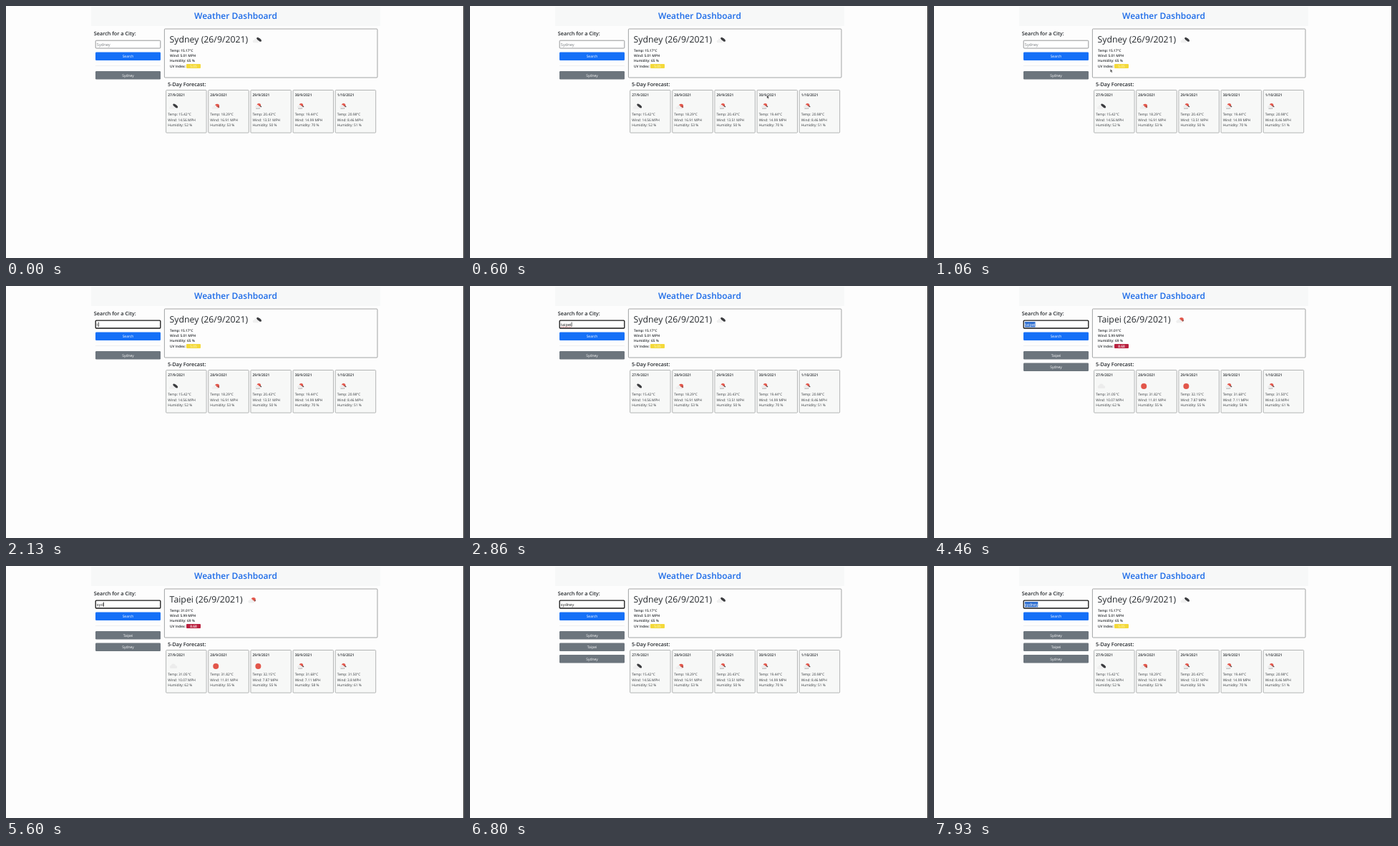
Recreate the animation shown at these times as an HTML page. Size 640x352 px, loop 8000 ms.

```html
<!DOCTYPE html>
<html lang="en">
<head>
<meta charset="utf-8">
<title>Weather Dashboard</title>
<style>
  html, body { margin: 0; width: 100%; height: 100%; overflow: hidden; background: #fdfdfd; }
  svg { display: block; width: 100vw; height: 100vh; }
  text { font-family: "Open Sans", "Noto Sans", sans-serif; fill: #24282c; text-rendering: geometricPrecision; white-space: pre; }
  .title { font-size: 12px; font-weight: 600; fill: #1c6be8; text-anchor: middle; }
  .head { font-size: 7.25px; font-weight: 600; }
  .city { font-size: 12.3px; font-weight: 500; }
  .now { font-size: 4.8px; font-weight: 600; }
  .date { font-size: 5px; font-weight: 600; }
  .day { font-size: 4.85px; fill: #33373b; }
  .btn { font-size: 5px; font-weight: 500; fill: #fff; text-anchor: middle; }
  .uv { font-size: 4.9px; font-weight: 600; text-anchor: middle; }
  .typed { font-size: 5.7px; }
  .card { fill: #f7f8f7; stroke: #a0a2a3; stroke-width: .8; }
</style>
</head>
<body>
<svg viewBox="0 0 640 352">
  <defs>
    <g id="cloud">
      <circle cx="-2.6" cy=".8" r="1.8"/><circle cx="-.2" cy="-.5" r="2.4"/>
      <circle cx="2.5" cy=".9" r="1.7"/><rect x="-4" y=".6" width="8" height="2" rx="1"/>
    </g>
    <g id="clear"><circle r="4" fill="#e2564a"/></g>
    <g id="grey"><use href="#cloud" fill="#ececec" transform="scale(1.2)"/></g>
    <g id="partly">
      <circle cx="1.8" cy="-.2" r="3.1" fill="#e2564a"/>
      <path d="M3 .2l2 1.4" stroke="#555" stroke-width="1"/>
      <use href="#cloud" x="-1.2" y="1.5" fill="#efefef"/>
    </g>
    <g id="dark">
      <ellipse cx="2.6" cy="-.5" rx="4" ry="1.8" transform="rotate(37 2.6 -.5)" fill="#3c3d40"/>
      <use href="#cloud" x="-1.8" y="1.3" fill="#f0f0f0"/>
    </g>
    <g id="rain">
      <circle cx="1" cy="-1.3" r="2.7" fill="#e2564a"/>
      <path d="M2.6-.6l2 1.6" stroke="#4a4a4c" stroke-width="1.2"/>
      <use href="#cloud" transform="translate(-.8 .4) scale(.85)" fill="#ededed"/>
      <path d="M-2 2.6l-.5 1.4M0 2.6l-.5 1.4M2 2.4l-.5 1.4" stroke="#66686b" stroke-width=".7"/>
    </g>
  </defs>

  <rect width="640" height="352" fill="#fdfdfd"/>
  <rect x="119" y="1" width="404" height="27" fill="#f7f8f8"/>
  <rect x="639" width="1" height="352" fill="#333"/>
  <text class="title" x="321" y="17.6">Weather Dashboard</text>

  <text class="head" x="122.8" y="40.8">Search for a City:</text>
  <rect id="box" x="125.2" y="48.2" width="90.6" height="10.8" rx="1" fill="#fff"/>
  <rect id="mark" x="126.8" y="50" height="7.4" fill="#2f6fd0"/>
  <text id="typed" class="typed" x="126.8" y="55.7"></text>
  <path id="spell" d="M127 57.2H141.5" stroke="#e04040" stroke-width=".6" stroke-dasharray="1 .5"/>
  <rect id="caret" y="50.5" width=".7" height="6.4" fill="#111"/>
  <rect x="125" y="64.5" width="91" height="11.4" rx="1.2" fill="#1570f7"/>
  <text class="btn" x="170.5" y="71.9">Search</text>
  <path d="M125 83.5H216" stroke="#ececec" stroke-width=".8"/>
  <g id="history"></g>

  <rect x="221.4" y="32" width="297.6" height="68" rx="1" fill="#fdfdfd" stroke="#8b8d8f" stroke-width=".8"/>
  <text class="head" x="226" y="111.6">5-Day Forecast:</text>
  <g id="report"></g>

  <path id="arrow" d="M0 0V4.6L1.1 3.7L2 5.4L2.8 5L2 3.4H3.4Z" fill="#333" stroke="#fff" stroke-width=".4"/>
  <path id="beam" d="M-1-3H1M0-3V3M-1 3H1" fill="none" stroke="#444" stroke-width=".5"/>
</svg>
<script>
const LOOP = 8000, STEP = 1000 / 15;
const $ = id => document.getElementById(id);
const show = (id, on) => $(id).setAttribute("visibility", on ? "visible" : "hidden");
const label = (cls, x, y, s, extra = "") => `<text class="${cls}" x="${x}" y="${y}" ${extra}>${s}</text>`;
const icon = (name, x, y) => `<use href="#${name}" x="${x}" y="${y}"/>`;

const DATES = ["27/9/2021", "28/9/2021", "29/9/2021", "30/9/2021", "1/10/2021"];
// Each row: temperature, wind, humidity, icon
const CITIES = {
  Sydney: {
    now: ["15.17", "5.01", 65, "dark"], iconX: 351, uv: "5.05", badge: "#f4d93a", ink: "#fdf3ad",
    days: [["15.42", "14.56", 52, "dark"], ["18.29", "16.91", 53, "partly"], ["20.43", "13.51", 50, "rain"],
           ["19.44", "14.99", 70, "rain"], ["20.98", "8.46", 51, "rain"]]
  },
  Taipei: {
    now: ["31.01", "5.99", 69, "partly"], iconX: 344, uv: "8.68", badge: "#b9213f", ink: "#fff",
    days: [["31.05", "10.07", 62, "grey"], ["31.82", "11.81", 55, "clear"], ["32.15", "7.87", 55, "clear"],
           ["31.68", "7.11", 58, "rain"], ["31.50", "3.8", 61, "rain"]]
  }
};

const SEARCHES = [
  { at: 0, city: "Sydney", history: ["Sydney"] },
  { at: 3200, city: "Taipei", history: ["Taipei", "Sydney"] },
  { at: 6800, city: "Sydney", history: ["Sydney", "Taipei", "Sydney"] }
];
const WORDS = [
  { text: "taipei", keys: [2130, 2200, 2330, 2530, 2660, 2860], select: 4330 },
  { text: "sydney", keys: [5260, 5400, 5600, 5730, 5860, 6000], select: 7930 }
];
const FOCUS = 1400;
const PATH = [[200, 555, 155], [1060, 242, 87], [1330, 168, 53]];

const readings = ([temp, wind, hum], cls, x, y) =>
  [`Temp: ${temp}°C`, `Wind: ${wind} MPH`, `Humidity: ${hum} %`]
    .map((s, i) => label(cls, x, y + i * 7.3, s)).join("");

function drawReport(name) {
  const c = CITIES[name];
  const cards = c.days.map((day, i) => {
    const x = 223.6 + i * 59.15;
    return `<rect class="card" x="${x}" y="117.5" width="56.5" height="59.6" rx="1"/>`
      + label("date", x + 2.6, 125.7, DATES[i]) + icon(day[3], x + 10.5, 140)
      + readings(day, "day", x + 2.6, 153.2);
  });
  $("report").innerHTML = label("city", 228.6, 51.2, `${name} (26/9/2021)`)
    + icon(c.now[3], c.iconX, 47.3) + readings(c.now, "now", 229, 63.8)
    + label("now", 229, 85.7, "UV Index:")
    + `<rect x="252" y="81" width="20" height="6" rx="1" fill="${c.badge}"/>`
    + label("uv", 262, 85.8, c.uv, `style="fill:${c.ink}"`) + cards.join("");
}

function drawHistory(names) {
  $("history").innerHTML = names.map((name, i) => {
    const y = 91 + i * 16.5;
    return `<rect x="125" y="${y}" width="91" height="11.4" rx="1.2" fill="#6c757d"/>`
      + label("btn", 170.5, y + 7.5, name);
  }).join("");
}

function drawInput(t) {
  const focused = t >= FOCUS;
  const word = WORDS.filter(w => t >= w.keys[0]).pop();
  const pressed = word ? word.keys.filter(k => t >= k) : [];
  const selected = !!word && t >= word.select;
  const typed = $("typed");
  typed.textContent = word ? word.text.slice(0, pressed.length) : "Sydney";
  typed.style.fill = selected ? "#fff" : word ? "#222" : "#7b7f83";
  const width = typed.getComputedTextLength();

  $("box").setAttribute("stroke", focused ? "#161616" : "#8a8c8e");
  $("box").setAttribute("stroke-width", focused ? 1.3 : .9);
  $("mark").setAttribute("width", width);
  show("mark", selected);
  show("spell", word === WORDS[0] && pressed.length === 6 && !selected);

  // The blink restarts with every key
  const since = t - (word ? pressed[pressed.length - 1] : FOCUS);
  $("caret").setAttribute("x", 127 + (word ? width : 0));
  show("caret", focused && !selected && since % 1000 < 500);
}

function drawPointer(t) {
  const now = Math.floor((t + 5) / STEP) * STEP;
  const leg = now < PATH[1][0] ? 0 : 1;
  const [[t0, x0, y0], [t1, x1, y1]] = PATH.slice(leg, leg + 2);
  const p = Math.min(1, Math.max(0, (now - t0) / (t1 - t0)));
  const ease = p * p * (3 - 2 * p);
  const place = `translate(${x0 + (x1 - x0) * ease} ${y0 + (y1 - y0) * ease})`;
  for (const id of ["arrow", "beam"]) $(id).setAttribute("transform", place);
  show("arrow", t >= 200 && t < PATH[2][0]);
  show("beam", t >= PATH[2][0] && t < WORDS[0].keys[0]);
}

let current;
function frame() {
  const t = performance.now() % LOOP;
  const search = SEARCHES.filter(s => t >= s.at).pop();
  if (search !== current) {
    current = search;
    drawReport(search.city);
    drawHistory(search.history);
  }
  drawInput(t);
  drawPointer(t);
  requestAnimationFrame(frame);
}
frame();
</script>
</body>
</html>
```
